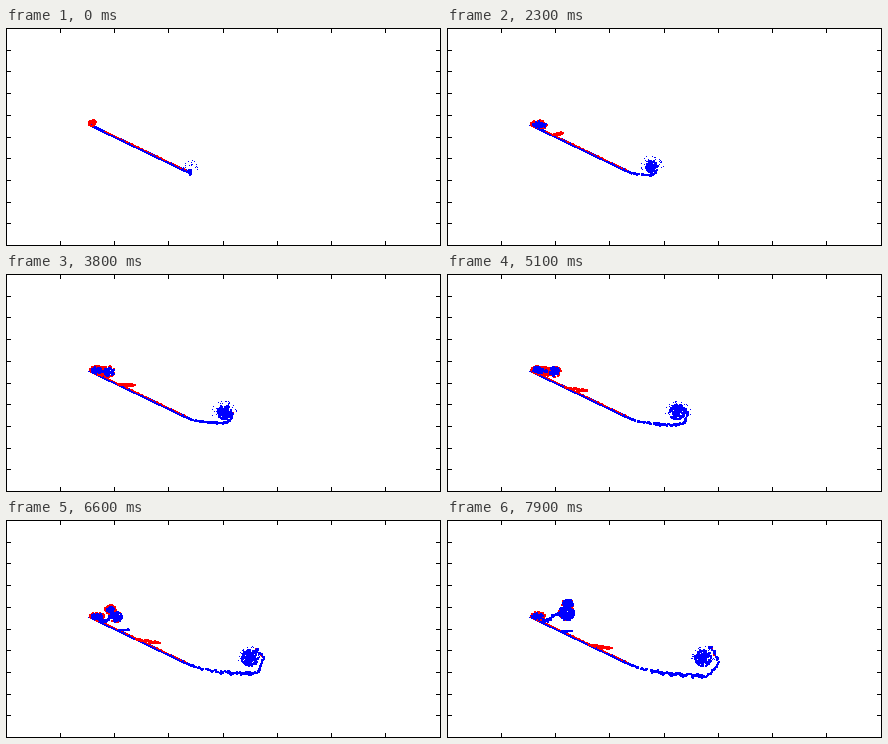
Animation, 435 px wide and 218 px high, one loop 8 s. Source, as a matplotlib script:

```python
import numpy as np
import matplotlib.pyplot as plt
from matplotlib.animation import FuncAnimation

W, H, DPI = 435, 218, 64
PX = 72 / DPI
FRAMES, STEP = 80, 100
RED, BLUE = "#ff0000", "#0000ff"
NOSE, TAIL = (84, 97), (184, 145)
NOSE_X, PLATE_Y = NOSE
SLOPE = (TAIL[1] - NOSE[1]) / (TAIL[0] - NOSE[0])

rng = np.random.default_rng(7)


def noise(n):
    """Per-particle randoms: position, angle, tint, spread."""
    u = rng.random((4, n))
    u[1] *= 2 * np.pi
    u[3] = u[3] * 2 - 1
    return u


NOSE_P, MID_P, ROLL_P, CORE_P = (noise(400) for _ in range(4))
HALO_P, WAKE_P, ARM_P = noise(26), noise(400), noise(130)
SKIN_P, FLAG_P, BARB_P, LINK_P = noise(170), noise(70), noise(20), noise(60)


def ramp(t, a, b):
    """Smooth step from 0 at a to 1 at b."""
    u = np.clip((t - a) / (b - a), 0, 1)
    return u * u * (3 - 2 * u)


def plate_y(x):
    return PLATE_Y + (x - NOSE_X) * SLOPE


def polar(cx, cy, r, a):
    return np.array([cx + r * np.cos(a), cy + r * np.sin(a)])


def blob(p, centre, rx, ry, blue, t):
    """Spinning ellipse resting on the plate; returns red and blue particles."""
    u, a, tint, _ = p[:, :int(np.pi * rx * ry * 1.1)]
    r = np.sqrt(u)
    a = a + 1.6 * t
    x = np.maximum(centre[0] + rx * r * np.cos(a), NOSE_X - 1)
    y = np.minimum(centre[1] + ry * r * np.sin(a), plate_y(x))
    inner = r + .25 * (tint - .5) < blue
    xy = np.array([x, y])
    return xy[:, ~inner], xy[:, inner]


def leading_vortices(t):
    """Bound vortex at the nose, then a pair that orbits and lifts off."""
    grow = ramp(t, 0, 2.5)
    parts = [blob(NOSE_P, (86 + 5 * grow, 95 + 1.5 * grow),
                  4.5 + 3 * grow, 3 + 1.5 * grow, .75 * grow, t)]
    if t > 1.8:
        young, late = ramp(t, 1.8, 4), ramp(t, 5, 7.9)
        px = 95 + 2.5 * (t - 1.8) + 10 * ramp(t, 6.4, 7.9)
        py = 97.5 - 9 * ramp(t, 5.3, 8)
        arm = 4.5 * ramp(t, 1.8, 5)
        turn = np.pi + .6 * max(t - 5.1, 0)
        size = 3 + 3 * young
        big = size + 2 * ramp(t, 6.6, 7.9)
        roll = polar(px, py, -arm, turn)
        parts += [blob(MID_P, polar(px, py, arm, turn), size, size - 1, .25 + .65 * late, t),
                  blob(ROLL_P, roll, big, big - .5, .8 + .15 * late, t)]
        if t > 6:
            parts.append((np.empty((2, 0)), link(roll)))
    red, blue = zip(*parts)
    return np.hstack(red), np.hstack(blue)


def link(end):
    """Curved sheet from the nose to the lifted vortex."""
    s, _, _, spread = LINK_P
    pts = np.array([(95, 99), (104, 105), (102, 92), end])
    w = np.array([(1 - s) ** 3, 3 * s * (1 - s) ** 2, 3 * s * s * (1 - s), s ** 3])
    return pts.T @ w + spread


def flag(p, tip, gap, length, thick):
    """Streak that leaves the plate and ends in a free tip."""
    u, _, _, spread = p
    x = tip - length * u
    root = plate_y(tip - length)
    y = root + (plate_y(tip) - gap - root) * (1 - u) ** .8
    y = y + thick * spread * np.sin(np.pi * (.15 + .85 * u))
    return np.array([x, np.minimum(y, plate_y(x))])


def skin():
    u, _, _, spread = SKIN_P
    x = 98 + 82 * u
    return np.array([x, plate_y(x) - 1.2 - .4 * spread])


def starting_vortex(t):
    """Wake, spiral arm, core and stray dots behind the trailing edge."""
    x0, y0 = TAIL
    cx, cy = x0 + 9.1 * t, 138 + 5 * np.exp(-t / 1.5)
    reach = 4 + 1.8 * t

    # the wake rolls up into clumps as it ages
    s, _, _, spread = WAKE_P[:, :int(8 + 2.6 * (cx - x0))]
    x = x0 + (cx - x0) * s
    roll = 1.2 * ramp(t, 2.5, 7) * ramp(x, 188, 212)
    phase = 2 * np.pi * (x - 8 * t) / 10
    drop = (1 - np.exp(-2.4 * s)) / (1 - np.exp(-2.4))
    y = y0 + (cy + reach - y0) * drop + .7 * roll * np.sin(phase)
    y = y + spread * (.5 + .5 * roll * (1 + np.cos(phase)))
    wake = np.array([x + roll * np.cos(phase), y])

    s, _, tint, spread = ARM_P[:, :int(6 + 2.8 * reach)]
    a = np.pi / 2 - np.pi * np.clip(t / 8, .1, .85) * s
    r = reach * (1 - .36 * s) + spread * (.4 + .08 * t)
    r = r + .12 * t * np.sin(14 * s - 3 * t)
    arm = polar(cx, cy, r, a)
    hot = (tint < .22) & (s > .6) & (t > 3.3)

    size = 2 + 6.5 * (1 - np.exp(-t / 2.2))
    u, a, _, _ = CORE_P[:, :int(.85 * np.pi * size ** 2)]
    r = size * u ** .7
    core = polar(cx, cy, r, a - 9 * t / (1 + (r / 4) ** 2))

    u, a, _, _ = HALO_P
    a = .2 - 1.15 * ((a / 2 + .35 * t) % np.pi)
    halo = polar(cx, min(cy, 141), 4 + 4 * ramp(t, 0, 3) + 5 * u, a)
    return arm[:, hot], np.hstack([wake, arm[:, ~hot], core]), halo


def particles(t):
    red, blue = leading_vortices(t)
    hot, shed, halo = starting_vortex(t)
    red, blue = [red, hot], [blue, shed]
    if t > .7:
        red.append(flag(FLAG_P, 96 + 8.75 * t, 7.5, 7 + 17 * ramp(t, .7, 6), 1.3))
    if t > 5.4:
        blue.append(flag(BARB_P, 111 + 1.8 * t, 6, 11, .5))
    return skin(), np.hstack(red), np.hstack(blue), halo


fig = plt.figure(figsize=(W / DPI, H / DPI), dpi=DPI, facecolor="white")
ax = fig.add_axes([0, 0, 1, 1])
ax.set(xlim=(0, W), ylim=(H, 0))
ax.axis("off")


def line(x, y, color="black", width=1, **kw):
    ax.plot(x, y, color=color, lw=width * PX, antialiased=False, clip_on=False, **kw)


def dots(color, size):
    return ax.plot([], [], "s", color=color, ms=size * PX, mew=0, antialiased=False)[0]


# integer coordinates snap to pixel centres; y runs down, so its lines sit one lower
right, bottom, tick = W - 1, H - 1, 4


def edge(x, y):
    line(x, y, snap=True)


edge([0, right, right, 0, 0], [0, 0, bottom, bottom, 0])
for k in range(1, 8):
    x = k * right // 8
    edge([x, x], [0, tick])
    edge([x, x], [bottom - tick, bottom])
for k in range(1, 10):
    y = int(k * bottom / 10 + .5)
    edge([0, tick], [y, y])
    edge([right - tick, right], [y, y])

line(*zip(NOSE, TAIL), color=BLUE, width=1.6)
layers = [dots(RED, 1), dots(RED, 2), dots(BLUE, 2), dots(BLUE, 1)]


def draw(i):
    for layer, xy in zip(layers, particles(i * STEP / 1000)):
        layer.set_data(*xy)
    return layers


anim = FuncAnimation(fig, draw, frames=FRAMES, init_func=lambda: draw(0),
                     interval=STEP, repeat=True, repeat_delay=0)
plt.show()
```
